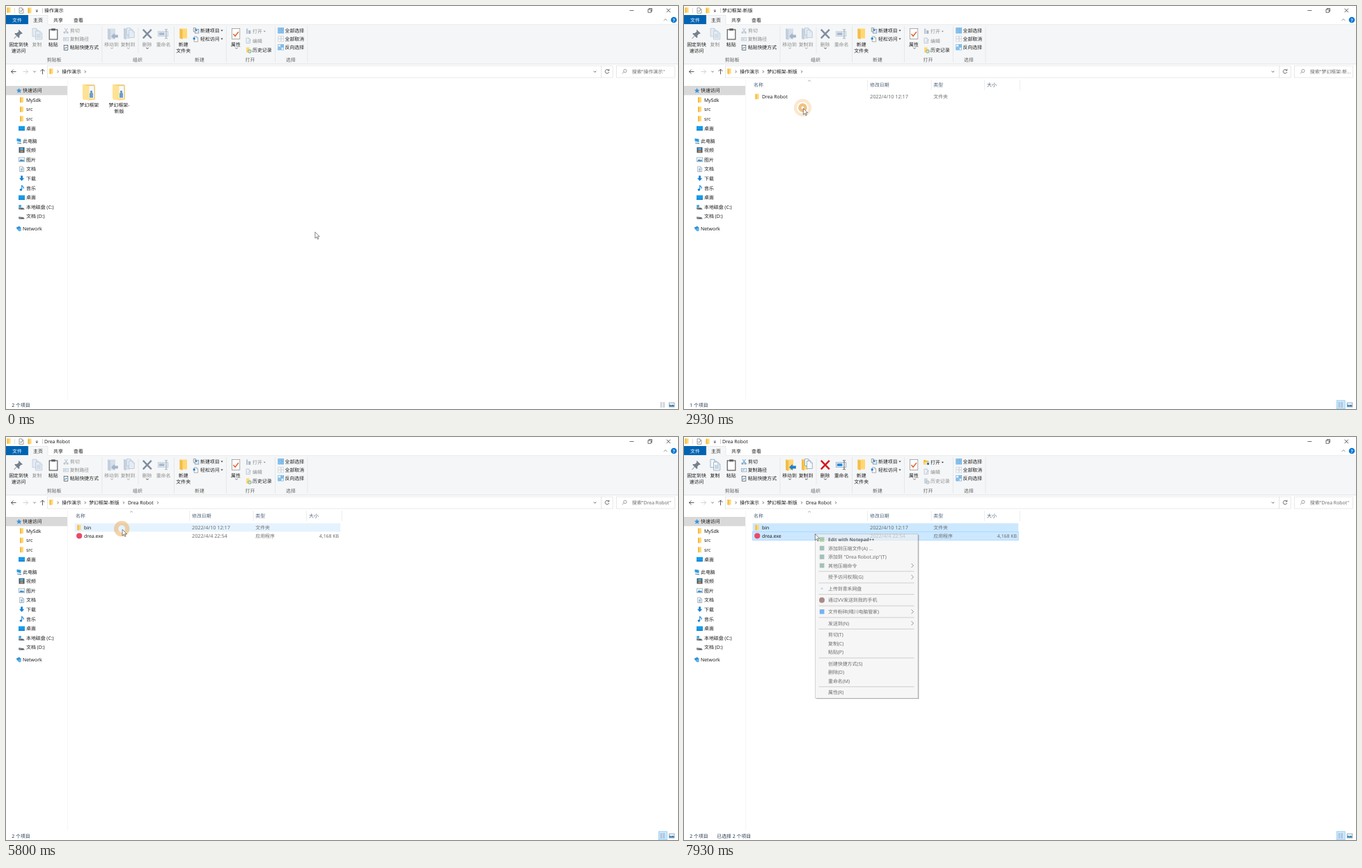
Animation of 965 by 580 pixels, one loop 8 s. Source, as an HTML page:

```html
<!DOCTYPE html>
<html lang="zh-CN">
<head>
<meta charset="utf-8">
<title>操作演示</title>
<style>
html, body { margin: 0; width: 100%; height: 100%; overflow: hidden; background: #fff; }
svg { display: block; width: 100%; height: 100%; }
text { font-family: "Noto Sans", "Noto Sans CJK SC", "Noto Sans CJK", sans-serif; text-rendering: geometricPrecision; white-space: pre; }
</style>
</head>
<body>
<svg id="stage" viewBox="0 0 965 580"></svg>
<script>
const LOOP = 8000, STEP = 200 / 3;
const INK = '#1c1c1c', DIM = '#8d8d8d', BLUE = '#1683d8';
const stage = document.getElementById('stage');

// Drawing helpers; text is placed by its vertical centre.
const text = (x, y, s, fill = INK, anchor = 'start', size = 6.9, weight = 400) =>
  `<text x="${x}" y="${y + 2.5}" fill="${fill}" text-anchor="${anchor}" font-size="${size}" font-weight="${weight}">${s}</text>`;
const mid = (x, y, s, fill) => text(x, y, s, fill, 'middle');
const rect = (x, y, w, h, fill, stroke = 'none', sw = .7) =>
  `<rect x="${x}" y="${y}" width="${w}" height="${h}" fill="${fill}" stroke="${stroke}" stroke-width="${sw}"/>`;
const path = (d, stroke, sw = .8, fill = 'none') =>
  `<path d="${d}" stroke="${stroke}" stroke-width="${sw}" fill="${fill}"/>`;
const shape = (d, fill) => path(d, 'none', 0, fill);
const dot = (x, y, r, fill, stroke = 'none', sw = .8) =>
  `<circle cx="${x}" cy="${y}" r="${r}" fill="${fill}" stroke="${stroke}" stroke-width="${sw}"/>`;
const vline = (x, y1, y2, c) => path(`M${x} ${y1}V${y2}`, c, .7);
const hline = (y, x1, x2, c) => path(`M${x1} ${y}H${x2}`, c, .7);
const right = (x, y, c = '#444', s = 1.7) => path(`M${x - s / 2} ${y - s}l${s} ${s}l${-s} ${s}`, c);
const down = (x, y, c = '#555') => path(`M${x - 1.7} ${y - .9}l1.7 1.7l1.7-1.7`, c);
const caret = (x, y, c = '#333') => shape(`M${x - 1.6} ${y - .8}h3.2l-1.6 1.8z`, c);

const folder = (x, y) => rect(x, y, 5, 7.6, '#ffd873') + shape(`M${x} ${y}l1.9 .8v7.4l-1.9-.7z`, '#f2b93f');
const page = (x, y, w, h, fill, stroke) =>
  path(`M${x} ${y}h${w * .65}l${w * .35} ${w * .35}v${h - w * .35}h${-w}z`, stroke, .7, fill) +
  path(`M${x + w * .65} ${y}v${w * .35}h${w * .35}`, stroke, .5);
const lines = (x, y, w, n, gap, c) => Array.from({ length: n }, (_, i) => hline(y + i * gap, x, x + w, c)).join('');
const desk = (x, y) => rect(x, y, 9, 6.4, '#159bea') + rect(x, y + 5.4, 9, 1, '#0870bd');

function bigFolder(x) {
  return shape(`M${x + 1} 113h15.5l1.5 1.5v20h-17z`, '#f3ce72') +
    rect(x + 8, 115, 8.5, 18, '#f6f8fa', '#d3d9df', .4) +
    shape(`M${x + 10} 126l2.5-4 2.5 4v6h-5z`, '#6d9fcb') + rect(x + 11, 122, 3, 1.4, '#4c86bd') +
    shape(`M${x} 112.5l9.5 3v20.5l-9.5-2.2z`, '#ffe293') +
    shape(`M${x + 9.5} 133.5l8.5-1v2l-8.5 1.5z`, '#ffdc82');
}

function titleBar(s) {
  let o = folder(1.5, 2) + vline(12.5, 3, 10, '#ccc') + page(19, 2.7, 6, 7.6, '#fff', '#777') +
    path('M20.3 6.6l1.3 1.5l2.2-3', '#555') + folder(31.5, 2.5) + hline(6, 42.7, 45.9, '#333') + caret(44.3, 8) +
    vline(52.5, 3, 10, '#bbb');
  if (s.tool) {
    o += rect(119.5, 0, 56, 13, '#e4ccf7') + rect(119.5, 13, 56, 13.5, '#fbf8fe') +
      mid(147.5, 6, '管理') + mid(147.5, 20, '应用程序工具');
  }
  return o + text(s.tool ? 181 : 55, 6.6, s.title) +
    hline(6.5, 895.5, 901.5, '#333') + rect(922, 5, 4.2, 4.2, 'none', '#333') + path('M923.4 5v-1.5h4.2v4.2h-1.4', '#333', .7) +
    path('M948.6 3.7l5.4 5.4m0-5.4l-5.4 5.4', '#333') +
    rect(0, 13, 32, 13.2, '#0063b1') + text(9, 20, '文件', '#fff') +
    path('M32.3 26.7V13.4H60V26.7', '#e1e2e3', .7, '#f5f6f7') +
    text(39, 20, '主页') + text(68, 20, '共享') + text(97, 20, '查看') +
    path('M944.5 21l2.5-2.4l2.5 2.4', '#777') + dot(959, 20, 4.3, '#0a77d1') + text(959, 20, '?', '#fff', 'middle', 6.5, 700);
}

function ribbon(s) {
  const on = s.count > 0, pick = (a, b) => on ? a : b, ink = pick(INK, DIM);
  const edge = pick('#7c97b2', '#b5c3d3'), paper = pick('#f4f9fd', '#e4ecf4');
  const gold = pick('#ffd873', '#d5dfea'), arrow = pick('#1f7fcf', '#a3b5c9');
  let o = rect(0, 26.7, 965, 57, '#f5f6f7') + hline(26.7, 60, 965, '#e4e5e6') + hline(83.5, 0, 965, '#dcdddf') +
    rect(32.7, 26, 27, 1.5, '#f5f6f7');
  for (const x of [138, 241.5, 316.5, 386.5, 433]) o += vline(x, 29, 81, '#e0e1e3');
  o += vline(190, 31, 68, '#e0e1e3');
  [[69, '剪贴板'], [189, '组织'], [278, '新建'], [350.5, '打开'], [409, '选择']]
    .forEach(([x, t]) => o += mid(x, 77.6, t, '#5f5f5f'));

  // Clipboard
  const pinInk = s.tool ? DIM : INK, pin = s.tool ? '#a9b2bc' : '#75818e';
  o += shape('M18.3 34l5.5 5.3l-1.3 .9l-.9-.3l-2.4 2.7l.2 2.5l-1.2 1l-6-6l1-1.2l2.5 .2l2.6-2.4l-.4-1.2z', pin) +
    path('M15 43.2l-3.4 3.8', pin, 1) + mid(18, 55.5, '固定到快', pinInk) + mid(18, 64.5, '速访问', pinInk);
  o += page(38, 32.3, 8.5, 11.5, paper, edge) + page(42.5, 36, 9.2, 12, paper, edge) +
    lines(44, 41, 6, 3, 2, edge) + mid(44.5, 55.5, '复制', ink);
  o += rect(62.2, 34, 11.6, 14, '#fff', '#4c4c4c', 1.1) + rect(65.2, 32.4, 5.6, 3, '#5c5c5c') + mid(67.7, 55.5, '粘贴');
  const cut = pick('#2878b8', '#97a8b9');
  o += path('M84.3 32l3 5.3m1-5.3l-3 5.3', cut, .7) + dot(84, 38.2, 1.1, 'none', cut) + dot(88.2, 38.2, 1.1, 'none', cut) +
    text(92, 35.6, '剪切', ink);
  o += rect(82.4, 45.5, 7.4, 4.4, paper, edge) + path('M84 48.4l1-1.7m.6 1.7l1-1.7', cut, .7) + text(91.7, 47.6, '复制路径', ink);
  o += rect(83.2, 56.4, 5.6, 7, '#fff', '#444') + path('M84.8 62v-2h2.4m-1.1-1.2l1.2 1.2l-1.2 1.2', BLUE, .7) + text(91.7, 59.6, '粘贴快捷方式');

  // Organise
  o += rect(146, 32.5, 11, 15, gold) + shape('M146 32.5l4 1.6v15l-4-1.6z', pick('#f2bd49', '#c2cfdd')) +
    shape('M151 43.5l4.8-4.6v2.7h5v3.8h-5v2.7z', arrow) + mid(151.5, 55.5, '移动到', ink) + down(152, 60.8, ink);
  o += rect(169, 32, 9, 15, gold) + shape('M169 32l3.5 1.5v15l-3.5-1.5z', pick('#f2bd49', '#c2cfdd')) +
    page(173.5, 31.5, 7.5, 10, paper, edge) + page(176.5, 34.5, 7.8, 11, paper, edge) +
    mid(175, 55.5, '复制到', ink) + down(175.7, 60.8, ink);
  o += path('M196.8 33.8l12 12.6m0-12.6l-12 12.6', pick('#d5161c', '#7f8da0'), 2.4) + mid(202.6, 55.5, '删除', ink) + down(203, 60.8, INK);
  o += rect(218.3, 36.7, 14.5, 6.8, paper, edge) + rect(219.8, 38.2, 7.6, 3.8, pick('#2589d8', '#a9bace')) +
    path('M228 33.5q2 0 2 1.2v11q0 1.2-2 1.2m4-13.4q-2 0-2 1.2m2 12.2q-2 0-2-1.2', pick('#444', '#8e9aa8')) + mid(226, 55.5, '重命名', ink);

  // New
  o += rect(249.5, 32.5, 10.5, 14, '#ffd873') + shape('M249.5 32.5l4 1.6v14l-4-1.6z', '#f2bd49') +
    mid(254.7, 55.5, '新建') + mid(254.7, 64.5, '文件夹');
  o += page(269.3, 31.5, 4, 5.5, '#fff', '#777') + rect(271.5, 33.5, 5.3, 5.6, '#dfecf6', '#6a89a4') + rect(272.3, 34, 2, 2, BLUE) +
    text(279, 35.6, '新建项目') + caret(310, 35.4);
  o += page(270.2, 44, 5.4, 7.3, '#fff', '#888') + shape('M268.7 45.5h3v2.8h-3z', BLUE) + text(279, 47.6, '轻松访问') + caret(310, 47.4);

  // Open
  o += rect(324.4, 32.4, 11.4, 15, '#fff', '#8a8a8a') + path('M326.4 40.2l2.7 3.1l4.8-6.2', '#e2602a', 1.5) + mid(330, 55.5, '属性') + down(331, 60.8);
  if (s.tool) o += rect(344.4, 33.6, 7.2, 6, '#eaf4fc', '#4d7596') + rect(346, 35, 3.5, 3, BLUE);
  else if (on) o += shape('M344 33h3l1 1h3.5v6h-7.5z', '#f0bc48') + shape('M345.5 36h6.8l-1.6 4h-6.5z', '#ffe08b') + rect(349, 37, 3, 3, BLUE);
  else o += rect(345, 32.5, 2.3, 7.5, '#b9c6d4') + rect(348.3, 35, 3, 5, '#a4b4c6');
  o += text(354, 36.6, '打开', ink) + caret(371.3, 36.6, ink);
  o += page(345, 46, 5.5, 7.5, '#edf2f7', '#aebccb') + path('M347.5 52l4-4', '#a0b1c4') + text(354, 50, '编辑', DIM);
  o += shape('M345 59.5h4.5v7.5h-4.5z', s.noHistory ? '#cbd5df' : '#ffd873') + dot(350, 65.2, 2.3, s.noHistory ? '#dfe5eb' : '#eef6ee', s.noHistory ? '#a6b2be' : '#57925d') +
    path('M350 63.8v1.5h1.2', s.noHistory ? '#a6b2be' : '#57925d', .5) + text(354, 63.6, '历史记录', s.noHistory ? DIM : INK);

  // Select
  for (const [y, kind] of [[31.5, 0], [43.5, 1], [55.5, 2]])
    for (let i = 0; i < 4; i++) {
      const lit = kind === 0 || (kind === 2 && (i === 1 || i === 2));
      o += rect(390.8 + i % 2 * 4.4, y + (i >> 1) * 4.2, 3.5, 3.4, lit ? '#85c4f2' : '#f8fafb', kind === 1 ? '#c3ccd4' : '#5ba4dc', .6);
    }
  return o + text(400.6, 35.6, '全部选择') + text(400.6, 47.6, '全部取消') + text(400.6, 59.6, '反向选择');
}

function addressBar(s) {
  let o = path('M14.5 94.5H7.5m3-3l-3 3l3 3', '#333') + path('M24.5 94.5h7m-3-3l3 3l-3 3', '#c8c8c8') + down(41, 94.5) +
    path('M52.5 98.3v-7.3m-3 3l3-3l3 3', '#333') +
    rect(59.5, 86, 795.5, 17, '#fff', '#dedede') + rect(855, 86, 16.5, 17, '#fff', '#dedede') + rect(876.5, 86, 84, 17, '#fff', '#dedede') +
    folder(62.5, 90) + right(74.5, 94.5) + down(845.7, 94.5, '#333') +
    path('M865.5 92.6a2.8 2.8 0 1 0 .4 2.4m.1-4.3v2.2h-2.3', '#444') +
    dot(889, 93.4, 2.2, 'none', '#777', .7) + path('M887.3 95l-2.4 2.4', '#777', .7) + text(899, 94.5, s.search, '#6a6a6a');
  s.crumbs.forEach(([x, t, end]) => o += text(x, 94.5, t) + right(end, 94.5));
  return o;
}

function sidebar() {
  const steel = '#5b86ad';
  let o = vline(88.7, 106, 566, '#f1f1f1') + rect(0, 115, 88, 13.3, '#d9d9d9');
  o += shape('M18.6 118l1.2 2.5l2.7 .2l-2 1.8l.7 2.7l-2.5-1.4l-2.4 1.4l.6-2.7l-2-1.8l2.6-.2z', '#3a93d8') + text(24, 121.6, '快速访问');
  [[135, 'MySdk'], [148.6, 'src'], [162.1, 'src']].forEach(([y, t]) => o += folder(20, y - 3.8) + text(29, y, t));
  for (const y of [176, 275.6]) o += desk(18, y - 3.2) + text(29, y, '桌面');
  o += shape('M15.5 190.5l6 1v4.5l-6-1.4z', '#2e9de0') + path('M16 197l6 .8', steel, 1.2) + text(24, 194, '此电脑');
  o += rect(18.5, 203.3, 8, 8, '#3f5870') + rect(20.3, 204.3, 4.4, 2.8, '#58b2df') + rect(20.3, 207.7, 4.4, 2.8, '#c48c52') + text(29, 207.6, '视频');
  o += rect(18.2, 218, 8.6, 6, '#e8f2f9', '#8da8bd') + shape('M18.8 223.5l2.7-3l2 1.5l1-1l2 2.5z', '#3e82b4') + text(29, 221.2, '图片');
  o += page(19.6, 231, 6, 7.5, '#fff', '#8c9aa6') + lines(21, 234, 3.3, 3, 1.5, steel) + text(29, 234.8, '文档');
  o += shape('M21.2 244.3h2.8v3.4h2.3l-3.7 4l-3.7-4h2.3z', '#1683d8') + text(29, 248.3, '下载');
  o += path('M22.7 264.2v-6.4q.4 1.8 2.4 2.8q.6 1-.2 2.2', '#1588da', 1.1) + dot(21.4, 264.4, 1.7, '#1588da') + text(29, 262, '音乐');
  for (const [y, t, lit] of [[289, '本地磁盘 (C:)', 1], [302.6, '文档 (D:)', 0]])
    o += shape(`M18.3 ${y + .6}l6.8 .9l1.5 1.7l-.4 .9h-7.4l-.9-1.6z`, '#7d858c') + hline(y + 2.8, 21.5, 24.8, '#333') +
      (lit ? rect(18.3, y - 2.6, 3.6, 3, '#2c9fe3') : '') + text(29, y, t);
  o += shape('M14.5 319l4.5-2.3l3 3l-4.5 3.2z', '#3192d4') + dot(19.6, 322, 2.3, '#5fb5e4') + text(24, 320.6, 'Network');
  return o;
}

const fills = { none: 'none', hover: '#e5f3ff', picked: '#cce8ff', focus: '#cce8ff' };
const edges = { focus: '#99d1ff' };

function content(s) {
  if (s.view === 'grid')
    return rect(141.3, 109.3, 41.5, 47.7, fills[s.rows[0]], edges[s.rows[0]]) +
      bigFolder(110) + bigFolder(153) + mid(119.4, 142, '梦幻框架') + mid(162.5, 142, '梦幻框架-') + mid(162.5, 151, '新版');
  const head = '#4d6079', grey = '#6d6d6d';
  let o = [[100, '名称'], [267, '修改日期'], [358.3, '类型'], [435, '大小']].map(([x, t]) => text(x, 113.5, t, head)).join('') +
    [263.5, 355.3, 431.5, 482.3].map(x => vline(x, 106, 121, '#e6e6e6')).join('') + path('M178 108.5l2-1.8l2 1.8', '#777', .6);
  const rows = s.view === 'sub' ? [['Drea Robot', '2022/4/10 12:17', '文件夹']] :
    [['bin', '2022/4/10 12:17', '文件夹'], ['drea.exe', '2022/4/4 22:54', '应用程序', '4,168 KB']];
  rows.forEach(([name, date, kind, size], i) => {
    const y = 130.2 + i * 12.1;
    o += rect(98.6, y - 6, 381.6, 12.1, fills[s.rows[i]], edges[s.rows[i]]) +
      (size ? dot(105.2, y, 4.1, '#ea4a68') : folder(102.5, y - 3.8)) + text(112, y, name) +
      text(267, y, date, grey, 'start', 7.25) + text(358.3, y, kind, grey) + (size ? text(478, y, size, grey, 'end') : '');
  });
  return o;
}

function statusBar(s) {
  const navy = '#24364d';
  return text(8.3, 574, (s.view === 'sub' ? 1 : 2) + ' 个项目', navy) +
    (s.count ? text(47.3, 574, s.count > 1 ? '已选择 2 个项目' : '选中 1 个项目', navy) : '') +
    (s.tool ? text(93, 574, '4.07 MB', navy) : '') +
    (s.view === 'grid' ? '' : rect(937.4, 567.8, 11.8, 12, '#cce8ff', '#7fc3f0')) +
    lines(939.5, 571, 2.8, 4, 2, '#7d8b98') + lines(943.3, 571, 2.8, 4, 2, '#7d8b98') +
    rect(952.2, 571, 7.6, 6, '#eaf3f9', '#7d8b98') + shape('M952.6 576.5v-3.3l2.5 1.5l2-1l2.3 1v1.8z', '#2f7db5');
}

const menu = [
  [147.5, 'Edit with Notepad++', 0, '#8fbf78'], [160, '添加到压缩文件(A) ...', 0, '#6f9f95'],
  [172.5, '添加到 "Drea Robot.zip"(T)', 0, '#6f9f95'], [185, '其他压缩命令', 1, '#6f9f95'], 193.3,
  [201.6, '授予访问权限(G)', 1], 210, [218, '上传到青禾网盘', 0, '#8ec8f5', 1.6], 226.5,
  [234.7, '通过VV发送到我的手机', 0, '#7a4a48', 4], 243, [251.4, '文件粉碎(晴川电脑管家)', 1, '#2b86ec'], 259.8,
  [268, '发送到(N)', 1], 276.4, [284.6, '剪切(T)'], [297, '复制(C)'], [309.5, '粘贴(P)'], 318,
  [326, '创建快捷方式(S)'], [338.5, '删除(D)'], [351, '重命名(M)'], 359.4, [367.6, '属性(R)']
];

function contextMenu(alpha) {
  if (alpha <= 0) return '';
  let o = rect(190, 141, 147.3, 236, '#777') + rect(188.6, 139.6, 147.4, 236.4, '#f1f1f1', '#a5a5a5');
  for (const item of menu) {
    if (!Array.isArray(item)) { o += hline(item, 193.5, 330.5, '#9c9c9c'); continue; }
    const [y, label, more, icon, r] = item, bold = label.startsWith('Edit');
    if (icon) o += r ? dot(198, y, r, icon) : rect(194.8, y - 3.3, 6.6, 6.6, icon);
    o += text(207, y, label, INK, 'start', bold ? 6.5 : 6.9, bold ? 600 : 400) + (more ? right(328, y, '#333', 3) : '');
  }
  return `<g opacity="${alpha}">${o}</g>`;
}

// Pointer stops: time, x, y
const track = [
  [1067, 443.6, 325], [1933, 169, 131], [2067, 170, 140], [2333, 171, 147], [3400, 171, 147], [3533, 171, 156],
  [3667, 171, 140], [4000, 166.8, 132.7], [6067, 166.8, 132.7], [6400, 192, 186], [6533, 192, 186],
  [6933, 192.5, 146], [7067, 192, 133.5], [7200, 191, 128], [7333, 191, 128], [7667, 188, 139.3]
];

function pointer(t) {
  const i = track.findIndex(k => k[0] > t);
  if (i === 0) return track[0].slice(1);
  if (i < 0) return track[track.length - 1].slice(1);
  const [t0, x0, y0] = track[i - 1], [t1, x1, y1] = track[i];
  const p = (t - t0) / (t1 - t0), e = p * p * (3 - 2 * p);
  return [x0 + (x1 - x0) * e, y0 + (y1 - y0) * e];
}

const clicks = [2600, 2860, 4470, 5270, 5600, 6460];
const ripples = t => clicks.map(c => {
  const p = (t - c) / 490;
  if (p < 0 || p >= 1) return '';
  const [x, y] = pointer(c), outer = 12.7 * (1 - (1 - p) ** 4), inner = Math.min(12 * p, outer - 1);
  return `<g opacity="${.85 * (1 - p)}">` +
    dot(x - .6, y - .6, (outer + inner) / 2, 'none', '#eda950', outer - inner) + '</g>';
}).join('');

function stateAt(t, x, y) {
  const view = t < 2930 ? 'grid' : t < 5730 ? 'sub' : 'app';
  const dragging = t >= 6530 && t < 7400;
  const picked = view === 'grid' ? [t >= 2600] : view === 'sub' ? [t >= 4470] : [t >= 7130, t >= 6930];
  const over = i => !dragging && (view === 'grid'
    ? x > 141 && x < 183 && y > 109 && y < 157
    : x > 98 && x < 480 && y > 124 + i * 12.1 && y < 136.2 + i * 12.1);
  const count = picked.filter(Boolean).length;
  const title = { grid: '操作演示', sub: '梦幻框架-新版', app: 'Drea Robot' }[view];
  return {
    view, dragging, count, title,
    rows: picked.map((on, i) => on ? over(i) ? 'focus' : 'picked' : over(i) ? 'hover' : 'none'),
    tool: view === 'app' && count === 1,
    noHistory: t >= 7400,
    search: view === 'sub' ? '搜索"梦幻框架-新...' : `搜索"${title}"`,
    crumbs: [[80.3, '操作演示', 113.7], [119.2, '梦幻框架-新版', 169], [175, 'Drea Robot', 218]]
      .slice(0, { grid: 1, sub: 2, app: 3 }[view])
  };
}

function draw(t) {
  const [x, y] = pointer(t), s = stateAt(t, x, y);
  const band = s.dragging
    ? rect(Math.min(x, 192), y, Math.max(.2, Math.abs(192 - x)), 186 - y, 'rgba(0,120,215,.3)', '#2b8ddd', .7) : '';
  const arrow = `<g transform="translate(${x} ${y})">` +
    path('M.3 .3v9l2.1-1.9l1.5 3.2l1.4-.6l-1.5-3.2h2.8z', '#333', .6, '#fff') + '</g>';
  stage.innerHTML = rect(0, 0, 965, 580, '#fff') + titleBar(s) + ribbon(s) + addressBar(s) + sidebar() + content(s) +
    statusBar(s) + band + ripples(t) + contextMenu(Math.min(1, (t - 7800) / 215)) + arrow;
}

let last = -1;
const start = performance.now();
function tick(now) {
  const step = Math.floor((Math.max(0, now - start) % LOOP + 5) / STEP) % (LOOP / STEP);
  if (step !== last) draw((last = step) * STEP + 4);
  requestAnimationFrame(tick);
}
tick(start);
</script>
</body>
</html>
```
